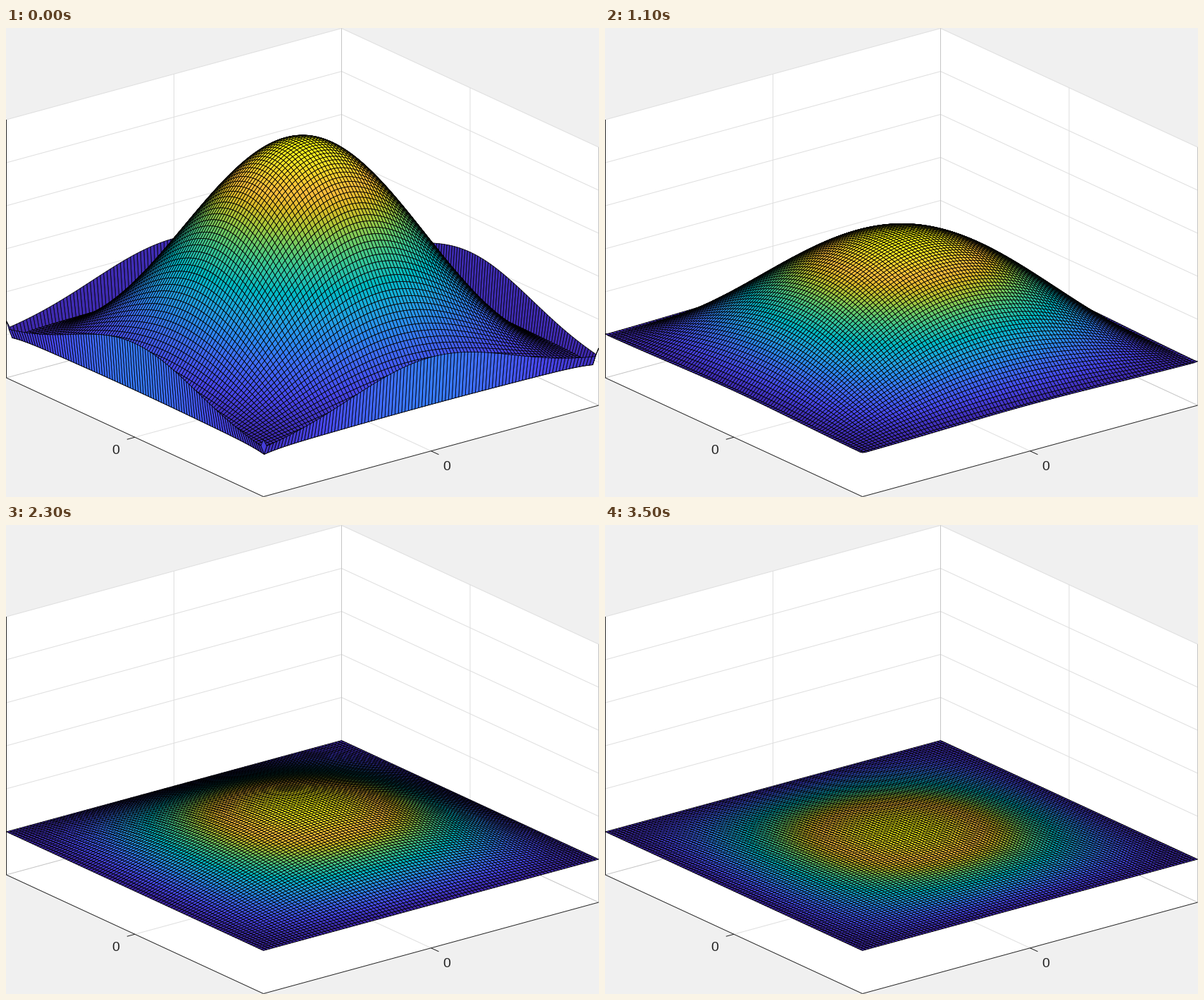
Animation, 842 px wide and 665 px high, one loop 3.65 s. Source, as a matplotlib script:

```python
import numpy as np
import matplotlib.pyplot as plt
from matplotlib.animation import FuncAnimation
from matplotlib.collections import PolyCollection
from matplotlib.colors import LinearSegmentedColormap

W, H = 842, 665
PX = 0.72                      # one pixel in points at 100 dpi
CELLS = 100
STATES = 22
TICK_MS, FIRST_TICKS, STEP_TICKS = 50, 10, 3

# Position on a 0..63 scale, then the colour there
STOPS = [
    (0, (0.2422, 0.1504, 0.6603)), (7, (0.2803, 0.2782, 0.9221)),
    (14, (0.2440, 0.4358, 0.9988)), (18, (0.1786, 0.5289, 0.9682)),
    (23, (0.1380, 0.6276, 0.8973)), (27, (0.0689, 0.6948, 0.8394)),
    (30, (0.0067, 0.7312, 0.7660)), (33, (0.1408, 0.7584, 0.6842)),
    (36, (0.2161, 0.7843, 0.5923)), (41, (0.4456, 0.8024, 0.3909)),
    (45, (0.6720, 0.7793, 0.2227)), (49, (0.8634, 0.7406, 0.1596)),
    (53, (0.9956, 0.7434, 0.2371)), (56, (0.9892, 0.8136, 0.1885)),
    (59, (0.9610, 0.8890, 0.1537)), (63, (0.9769, 0.9839, 0.0805))]
PARULA = LinearSegmentedColormap.from_list(
    "parula_like", [(k / 63, rgb) for k, rgb in STOPS])

# Floor corners of the box on screen, and its vertical unit
LEFT = np.array([0.5, 496.0])
FRONT = np.array([365.5, 664.5])
RIGHT = np.array([841.5, 535.0])
BACK = LEFT + RIGHT - FRONT
UP = np.array([0.0, -61.0])
S_DIR = (FRONT - LEFT) / 2
T_DIR = (BACK - LEFT) / 2
CENTRE = (LEFT + RIGHT) / 2

fig = plt.figure(figsize=(W / 100, H / 100), dpi=100, facecolor="#f0f0f0")
ax = fig.add_axes([0, 0, 1, 1])
ax.set_xlim(0, W)
ax.set_ylim(H, 0)
ax.axis("off")


def line(p, q, color):
    ax.plot([p[0], q[0]], [p[1], q[1]], color=color, lw=PX,
            solid_capstyle="butt", snap=False, zorder=2)


def draw_box():
    top = 6 * UP
    outline = [LEFT, LEFT + top, BACK + top, RIGHT + top, RIGHT, FRONT]
    ax.fill(*np.array(outline).T, color="white", lw=0, zorder=1)

    grid, edge, ink = "#dfdfdf", "#c4c4c4", "#262626"
    for k in range(1, 7):
        line(LEFT + k * UP, BACK + k * UP, grid)
        line(BACK + k * UP, RIGHT + k * UP, grid)
    mid_lb, mid_br = (LEFT + BACK) / 2, (BACK + RIGHT) / 2
    mid_lf, mid_fr = (LEFT + FRONT) / 2, (FRONT + RIGHT) / 2
    line(mid_lb, mid_lb + top, grid)
    line(mid_br, mid_br + top, grid)
    line(mid_lf, mid_br, grid)
    line(mid_fr, mid_lb, grid)

    line(LEFT, BACK, edge)
    line(BACK, RIGHT, edge)
    line(BACK, BACK + top, edge)
    line(RIGHT, RIGHT + top, edge)

    line(LEFT, LEFT + top, ink)
    line(LEFT, FRONT, ink)
    line(FRONT, RIGHT, ink)
    line(mid_lf, mid_lf - 0.047 * T_DIR, ink)
    line(mid_fr, mid_fr + 0.06 * S_DIR, ink)
    for x, y in ((156, 598), (626, 620.5)):
        ax.text(x, y, "0", fontsize=19.5 * PX, family="Liberation Sans",
                color=ink, ha="center", va="center_baseline", zorder=3)


# Grid indices run from the back corner towards the viewer
axis = np.linspace(-1, 1, CELLS + 1)
S, T = np.meshgrid(axis, -axis, indexing="ij")
MODE = np.clip(np.cos(np.pi * S / 2) * np.cos(np.pi * T / 2), 0, 1)
DIP = (S * T)**10
RIM = np.exp(-2.1 * axis**2)


def heights(n):
    """Height in pixels after n diffusion steps: a hill inside a raised rim."""
    rate = 0.87 if n < 5 else 0.88
    peak = min(297, 163 * rate**(n - 5))
    fade = 0.58**n
    z = peak * MODE**(1 + 0.4 * 0.6**n) - 6 * fade * DIP
    z[[0, -1], :] = 72 * fade * RIM
    z[:, [0, -1]] = 72 * fade * RIM[:, None]
    z[np.ix_([0, -1], [0, -1])] = 20 * fade
    return z


def cells(z):
    origin = CENTRE + UP
    x = origin[0] + S * S_DIR[0] + T * T_DIR[0]
    y = origin[1] + S * S_DIR[1] + T * T_DIR[1] - z
    p = np.stack([x, y], axis=-1)
    quads = np.stack([p[:-1, :-1], p[1:, :-1], p[1:, 1:], p[:-1, 1:]], axis=2)
    shade = (z - z.min()) / (z.max() - z.min())
    # each cell takes the colour of its nearest vertex
    return quads.reshape(-1, 4, 2), PARULA(shade[1:, 1:].ravel())


def render_states():
    """Draw each distinct surface once; the loop then only swaps pictures."""
    surface = PolyCollection([], edgecolors="black", linewidths=0.8 * PX,
                             zorder=4)
    ax.add_collection(surface, autolim=False)
    pictures = []
    for n in range(STATES):
        quads, colors = cells(heights(n))
        surface.set_verts(quads)
        surface.set_facecolor(colors)
        fig.canvas.draw()
        pictures.append(np.asarray(fig.canvas.buffer_rgba()).copy())
    surface.remove()
    return pictures


draw_box()
pictures = render_states()
screen = ax.imshow(pictures[0], extent=(0, W, H, 0), aspect="auto",
                   interpolation="nearest", zorder=10)


def update(i):
    n = 0 if i < FIRST_TICKS else 1 + (i - FIRST_TICKS) // STEP_TICKS
    screen.set_data(pictures[n])
    return [screen]


anim = FuncAnimation(fig, update,
                     frames=FIRST_TICKS + STEP_TICKS * (STATES - 1),
                     interval=TICK_MS, repeat=True, repeat_delay=0)
plt.show()
```
